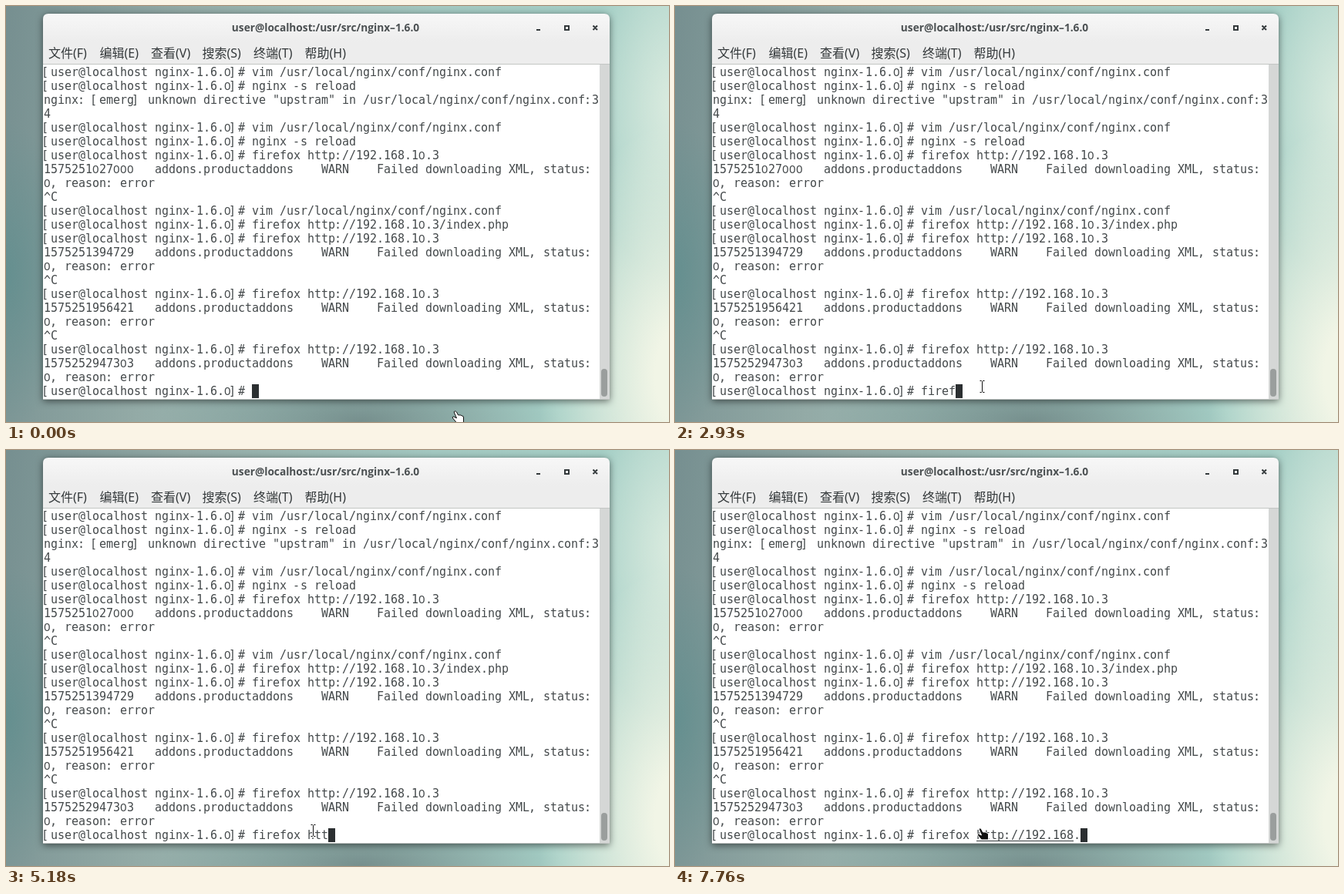
Write an HTML page that moves like this. It is 860 px wide and 540 px high and loops after 8000 ms.

```html
<!DOCTYPE html>
<html lang="zh">
<head>
<meta charset="utf-8">
<title>Terminal</title>
<style>
  html, body { margin: 0; width: 100%; height: 100%; overflow: hidden; }
  body {
    background:
      radial-gradient(ellipse 190px 330px at 880px 480px, #f1f5e6 20%, #f1f5e600),
      radial-gradient(ellipse 120px 220px at 870px 130px, #dcece0, #dcece000),
      radial-gradient(ellipse 90px 200px at 0 350px, #5f8e8ecc, #5f8e8e00),
      radial-gradient(ellipse 260px 90px at 460px 540px, #768f8d, #768f8d00),
      linear-gradient(97deg, #768f90, #93aaa6 25%, #a3c8c1 60%, #a5cfc6 85%, #b4d8ce);
  }
  svg { display: block; }
  .term { font: 15px "DejaVu Sans Mono", monospace; fill: #44494b; }
  .zero { font: 15px "Noto Sans", sans-serif; }
  .title { font: 700 13.7px "Open Sans", sans-serif; fill: #4b5052; text-anchor: middle; }
  .menu { font: 16px "Noto Sans", "Noto Sans CJK SC", sans-serif; fill: #34393b; }
  .window { filter: drop-shadow(0 2px 5px #0008); }
</style>
</head>
<body>
<svg width="860" height="540" viewBox="0 0 860 540">
  <defs>
    <linearGradient id="bar" x2="0" y2="46" gradientUnits="userSpaceOnUse">
      <stop stop-color="#fafafa"/><stop offset="1" stop-color="#ededed"/>
    </linearGradient>
  </defs>
  <path class="window" fill="url(#bar)" d="M48 511V17q0-7 7-7H776q7 0 7 7V511Z"/>
  <path fill="#ededed" d="M48 47H783V511H48Z"/>
  <path fill="#fff" d="M48 76H770V510H48Z"/>
  <path fill="#d5d7d6" d="M770 76H783V510H770Z"/>
  <rect x="772" y="471" width="8" height="36" rx="4" fill="#9a9e9d"/>
  <path stroke="#c3c6c4" d="M48 75.5H783M48 510.5H783"/>
  <text class="title" x="414.5" y="33">user@localhost:/usr/src/nginx–1.6.0</text>
  <g fill="none" stroke="#33393b" stroke-width="2">
    <path d="M688 31H693M725 26H730V31H725ZM761.5 25.5L767 31M767 25.5L761.5 31"/>
  </g>
  <g class="menu" id="menu"></g>
  <g class="term" id="screen"></g>
  <rect id="block" y="491" width="9" height="18" fill="#2b2f31"/>
  <path id="underline" stroke="#2e3436"/>
  <g id="beam" fill="none" stroke-linecap="square">
    <path stroke="#fff" stroke-width="3" d="M-2-7.5H2M0-7V7M-2 7.5H2"/>
    <path stroke="#111" d="M-2.5-7.5H-1L0-6.5 1-7.5H2.5M0-6V6M-2.5 7.5H-1L0 6.5 1 7.5H2.5"/>
  </g>
  <path id="hand" stroke-linejoin="round"
    d="M-2-7Q-4-7-3-5L0 2-4 0Q-6 0-5 2L0 8H9L9 1Q9-1 7-1L5-2 2-2 0-6Q-1-7-2-7Z"/>
</svg>
<script>
const LOOP = 8000, CELL = 9, LEFT = 49, TOP = 77, ROW = 18, COLS = 80;
const $ = id => document.getElementById(id);

const prompt = '[user@localhost nginx-1.6.0]# ';
const vim = prompt + 'vim /usr/local/nginx/conf/nginx.conf';
const reload = prompt + 'nginx -s reload';
const url = 'http://192.168.10.3';
const open = prompt + 'firefox ' + url;
const warn = id => id + '   addons.productaddons    WARN    Failed downloading XML, status: 0, reason: error';

const history = [
  vim, reload,
  'nginx: [emerg] unknown directive "upstram" in /usr/local/nginx/conf/nginx.conf:34',
  vim, reload, open, warn(1575251027000), '^C',
  vim, open + '/index.php', open, warn(1575251394729), '^C',
  open, warn(1575251956421), '^C',
  open, warn(1575252947303),
].flatMap(line => line.match(new RegExp(`.{1,${COLS}}`, 'g')));

// Narrow glyphs sit at the left of their cells.
const shift = c => '[]'.includes(c) ? -3 : ',:-'.includes(c) ? -1 : 0;

function row(text, i) {
  const xs = [...text].map((c, n) => LEFT + n * CELL + shift(c));
  const glyphs = text.replace(/ /g, '\u00a0').replace(/0/g, '<tspan class="zero">0</tspan>');
  return `<text x="${xs.join(' ')}" y="${TOP + 14 + i * ROW}">${glyphs}</text>`;
}

$('menu').innerHTML = ['文件(F)', '编辑(E)', '查看(V)', '搜索(S)', '终端(T)', '帮助(H)']
  .map((label, i) => `<text x="${55 + i * 66.5}" y="67">${label}</text>`).join('');
$('screen').innerHTML = history.map(row).join('') + '<g id="input"></g>';

// Moments of each key press; "<" deletes one character.
const keys = 'firefox < http://192.168.';
const times = [1770, 1920, 2080, 2380, 2930, 3080, 3240, 3780, 4170, 4320,
  4950, 5060, 5180, 5350, 5730, 5890, 6050,
  6510, 6770, 6900, 7050, 7200, 7360, 7610, 7760];

function typedAt(t) {
  let text = '';
  times.forEach((at, i) => {
    if (t >= at) text = keys[i] === '<' ? text.slice(0, -1) : text + keys[i];
  });
  return text;
}

function pointerAt(t) {
  if (t >= 1140) return [398, 494];
  const step = t < 70 ? 0 : Math.min(9, Math.floor((t - 70) / 93.75) + 1);
  const p = 1 - (1 - step / 9) ** 2;
  return [584 - 190 * p, 533 - 41 * p - 16 * Math.sin(Math.PI * p)].map(Math.round);
}

let shown;
function draw(t) {
  const text = typedAt(t);
  if (text !== shown) $('input').innerHTML = row(prompt + (shown = text), history.length);

  const blinkOff = t >= 240 && t < 820 || t >= 1450 && t < 1770;
  $('block').setAttribute('x', LEFT + (prompt.length + text.length) * CELL);
  $('block').style.display = blinkOff ? 'none' : '';

  const hover = t >= 6640;
  const link = text.replace(/\.$/, '').length;
  const start = LEFT + prompt.length * CELL;
  $('underline').setAttribute('d', hover ? `M${start + 8 * CELL} 507.5H${start + link * CELL}` : '');

  const [x, y] = pointerAt(t);
  const isHand = hover || y > 511;
  const at = `translate(${x + 0.5} ${y})`;
  $('beam').setAttribute('transform', at);
  $('beam').style.display = isHand ? 'none' : '';
  $('hand').setAttribute('transform', hover ? 'translate(397.5 498)' : at);
  $('hand').setAttribute('fill', hover ? '#111' : '#fff');
  $('hand').setAttribute('stroke', hover ? '#fff' : '#111');
  $('hand').style.display = isHand ? '' : 'none';
}

function frame(now) {
  draw(now % LOOP);
  requestAnimationFrame(frame);
}
requestAnimationFrame(frame);
</script>
</body>
</html>
```
